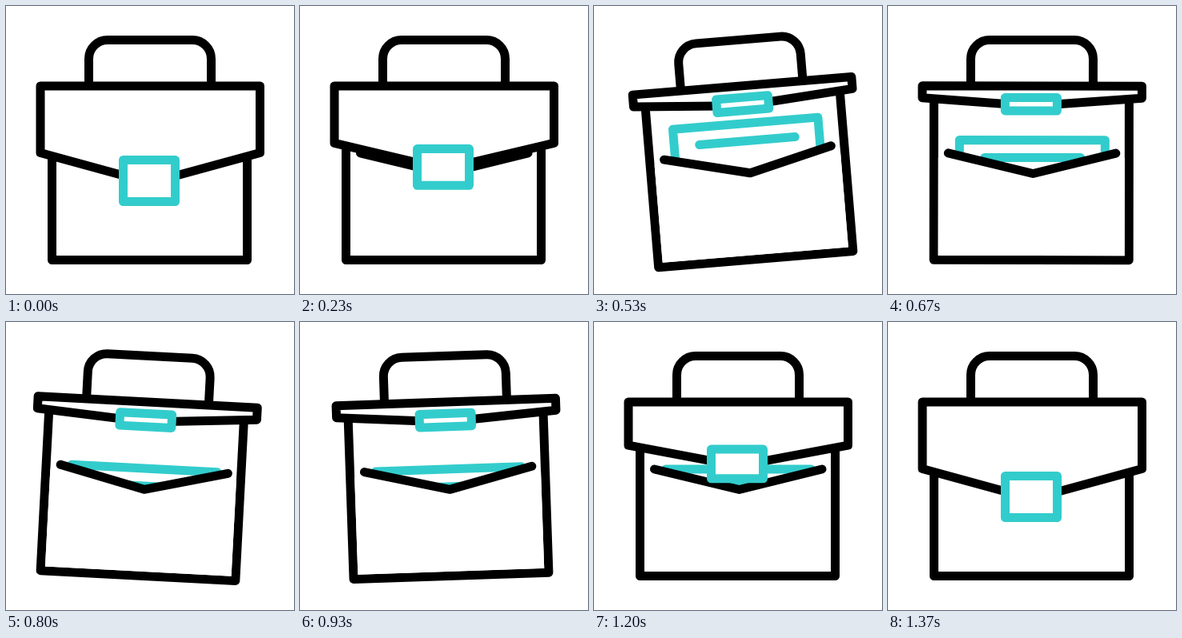
Write an HTML page that moves like this. It is 360x360 px and loops after 1.67 s.

```html
<!DOCTYPE html>
<html lang="en">
<head>
<meta charset="utf-8">
<title>Briefcase</title>
<style>
  html, body { margin: 0; height: 100%; overflow: hidden; background: #fff; }
  svg { display: block; width: 100vw; height: 100vh; }
  path { fill: #fff; stroke: #000; stroke-width: 11; stroke-linecap: round; stroke-linejoin: round; }
  .accent { stroke: #3cc; }
  .mask { stroke: none; }
  .line { fill: none; }
</style>
</head>
<body>
<svg viewBox="0 0 360 360">
  <g id="bag">
    <path d="M103.500 96V66A23.500 23.500 0 0 1 127 42.500H233A23.500 23.500 0 0 1 256.500 66V96"/>
    <path d="M57.500 110V317.500H301.500V110"/>
    <g id="paper">
      <path class="accent" d="M89.500 90V0H271.500V90"/>
      <path class="accent" d="M121 22H241"/>
    </g>
    <path class="mask" d="M75.500 184L181.500 209.500L285 184L296 190V312H63V190Z"/>
    <path class="line" d="M75.500 184L181.500 209.500L285 184"/>
    <path id="flap"/>
    <path id="buckle" class="accent"/>
  </g>
</svg>
<script>
  const LOOP = 1670;
  const [bag, paper, flap, buckle] =
    ["bag", "paper", "flap", "buckle"].map(id => document.getElementById(id));

  // Each swing: start, end, peak angle in degrees
  const swings = [[320, 670, -5], [670, 850, 4], [850, 1030, -2]];

  const mix = (a, b, k) => a + (b - a) * k;
  const ease = (t, start, end) => {
    const p = Math.min(1, Math.max(0, (t - start) / (end - start)));
    return (1 - Math.cos(Math.PI * p)) / 2;
  };

  function angleAt(t) {
    const swing = swings.find(([start, end]) => t >= start && t < end);
    if (!swing) return 0;
    const [start, end, peak] = swing;
    return peak * Math.sin(Math.PI * (t - start) / (end - start));
  }

  function draw(t) {
    const closed = 1 - ease(t, 170, 390) + ease(t, 1010, 1360);
    const side = mix(115, 183.5, closed);
    const tip = mix(125, 221, closed);
    const top = mix(114.5, 192.5, closed);
    const bottom = mix(131, 244.5, closed);

    flap.setAttribute("d", `M43 100H317.500V${side}L180 ${tip}L43 ${side}Z`);
    buckle.setAttribute("d", `M146.500 ${top}H211.500V${bottom}H146.500Z`);
    paper.setAttribute("transform", `translate(0 ${mix(144, 184, ease(t, 465, 835))})`);
    bag.setAttribute("transform", `rotate(${angleAt(t)} 180 42)`);
  }

  const begin = performance.now();
  function tick() {
    draw((performance.now() - begin) % LOOP);
    requestAnimationFrame(tick);
  }
  tick();
</script>
</body>
</html>
```
